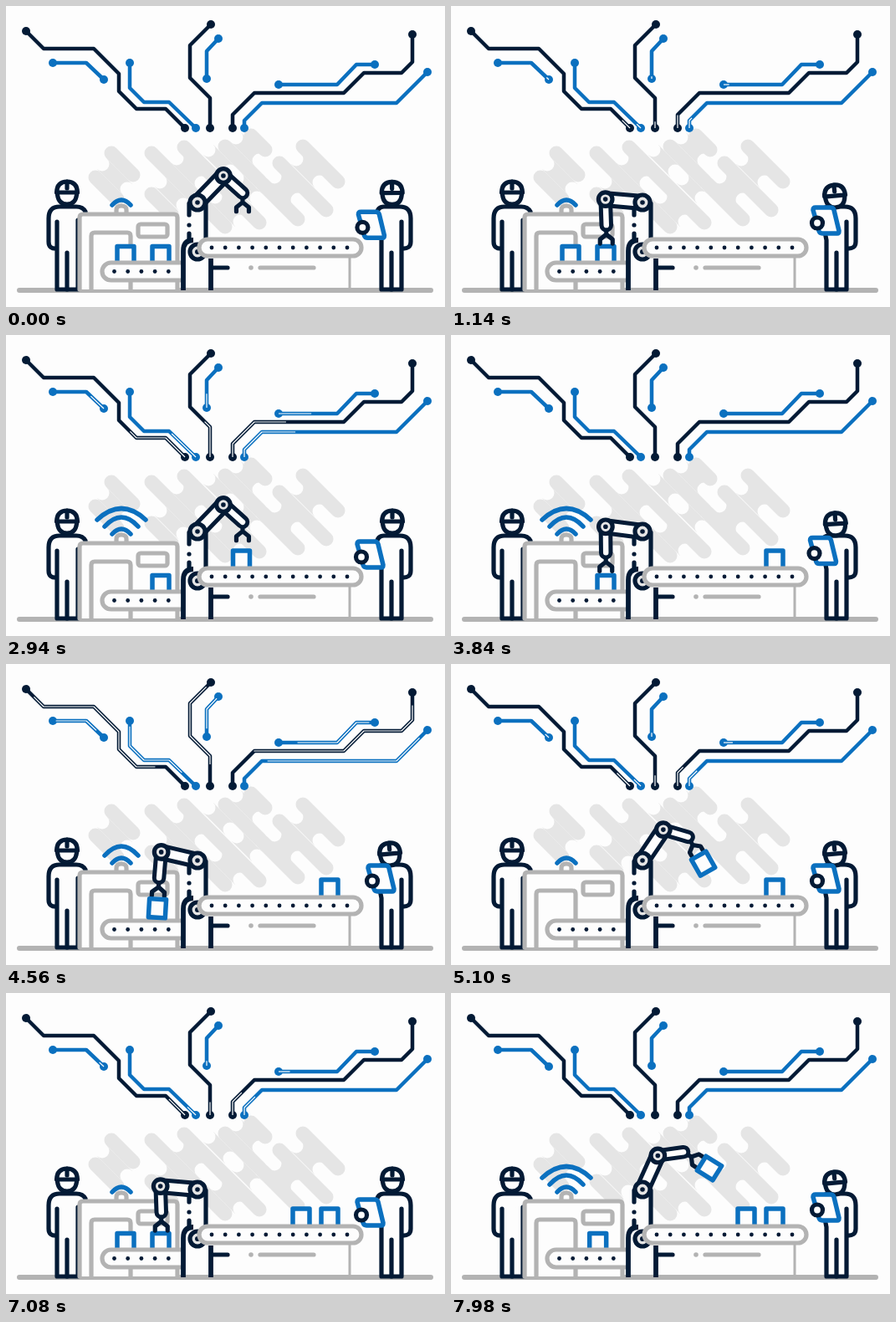
Recreate the animation shown at these times as an HTML page. Size 525 by 360 pixels, loop 8 s.

```html
<!DOCTYPE html>
<html lang="en">
<head>
<meta charset="utf-8">
<title>Smart factory</title>
<style>
html, body { margin: 0; width: 100%; height: 100%; overflow: hidden; background: #fdfdfd; }
svg { display: block; width: 525px; height: 360px; }
svg * { fill: none; stroke-linecap: round; stroke-linejoin: round; }
.navy { stroke: #031a35; stroke-width: 5.2; }
.blue { stroke: #0b70bf; stroke-width: 5.5; }
.gray { stroke: #b3b3b3; stroke-width: 5.2; }
.blob { stroke: #e5e5e5; stroke-width: 17; }
.gap { stroke: #fdfdfd; }
.wire { stroke-width: 4.5; }
.pulse { stroke: #fff; stroke-width: 1.2; }
.butt { stroke-linecap: butt; }
.solid { fill: #fdfdfd; }
.pin { fill: #e5e5e5; }
.dot { fill: #031a35; }
.dot.blue { fill: #0b70bf; stroke: none; }
.dot.gray { fill: #b3b3b3; stroke: none; }
</style>
</head>
<body>
<svg id="stage" viewBox="0 0 525 360">
  <defs><clipPath id="door"><rect x="104" y="240" width="120" height="70"/></clipPath></defs>
  <g id="blobs"></g>
  <g id="wires"></g>

  <path class="gray" d="M16 340H508" style="stroke-width:6"/>
  <g id="leftWorker" class="navy">
    <path class="solid" d="M61 258V339H86V256M61 290Q51 291 51 282V254Q51 240 64 240H84Q92 240 95 246"/>
    <path d="M73 295V339"/>
  </g>

  <path class="gray solid" d="M132 247V244Q132 239 138 239T144 244V247"/>
  <path class="gray solid" d="M88 339V253Q88 249 92 249H201Q205 249 205 253V339"/>
  <path class="gray" d="M102 339V275Q102 271 106 271H145Q149 271 149 275V339"/>
  <rect class="gray" x="158" y="261" width="35" height="15" rx="3"/>
  <g class="blue">
    <path d="M127 238Q138 226 149 238"/>
    <path id="wave1" d="M118 229Q138 207 158 229"/>
    <path id="wave2" d="M109 221Q138 194 167 221"/>
  </g>
  <g id="leftBoxes" clip-path="url(#door)"></g>
  <rect class="gray solid" x="115" y="307" width="120" height="21" rx="10.5"/>
  <g id="leftDots"></g>

  <path class="solid" d="M219 236H239V280L245 300V337H212V292L219 280Z"/>
  <path class="navy" d="M219 236V250M219 272V279M239 236V280"/>
  <path class="navy butt" d="M212 340V293Q212 280 224 280M245 302V340" style="stroke-width:5.8"/>
  <circle class="dot" cx="219" cy="262" r="2.6"/>
  <circle class="navy pin" cx="229" cy="294" r="9"/>
  <circle class="dot" cx="229" cy="294" r="3"/>
  <path class="navy" d="M247 313H265"/>
  <path class="gray" d="M411 300V338" style="stroke-width:3"/>
  <circle class="dot gray" cx="293" cy="313" r="2.8"/>
  <path class="gray" d="M304 313H368"/>
  <g id="rightBoxes"></g>
  <rect class="gray solid" x="231" y="279" width="194" height="20" rx="10"/>
  <g id="rightDots"></g>

  <g id="arm"></g>
  <g id="carried"></g>

  <g class="navy">
    <path class="solid" d="M473 258V339H449V280L443 250Q444 240 452 240H471Q484 240 484 254V282Q484 291 473 290"/>
    <path d="M461 295V339"/>
  </g>
  <g id="rightHead"></g>
  <g id="tablet">
    <path class="blue solid" d="M423 247H441Q444 247 445 250L451 275Q451 278 449 278H431Q428 278 427 275L420 250Q420 247 423 247Z"/>
    <circle class="navy solid" cx="425" cy="265.5" r="6.5"/>
  </g>
</svg>
<script>
const $ = id => document.getElementById(id);
const make = (parent, tag, cls, attrs) => {
  const el = document.createElementNS('http://www.w3.org/2000/svg', tag);
  el.setAttribute('class', cls);
  for (const k in attrs) el.setAttribute(k, attrs[k]);
  return parent.appendChild(el);
};
const path = (parent, cls, d) => make(parent, 'path', cls, { d });
const disc = (parent, cls, cx, cy, r) => make(parent, 'circle', cls, { cx, cy, r });

// Background: 45 degree capsules, joined by bridges with hollow ends ("x y run")
const capsules = ['126 176 26', '107 205 26', '174 176 88', '213 169 90', '262 168 42', '293 155 17',
  '174 225 24', '355 168 42', '327 188 56', '307 213 42'];
const bridges = ['115 189 30', '204 182 30', '250 228 30', '242 172 26', '276 206 24', '275 157 28',
  '184 210 28', '347 183 28', '321 204 28'];
const diagonal = (cls, text) => {
  const [x, y, run] = text.split(' ').map(Number);
  path($('blobs'), cls, `M${x} ${y}l${run} ${run}`);
  return [[x, y], [x + run, y + run]];
};
const hollows = bridges.flatMap(b => diagonal('blob butt', b));
for (const [x, y] of hollows) disc($('blobs'), 'solid', x, y, 8.5);
for (const c of capsules) diagonal('blob', c);

const wires = [
  ['navy', '24 30 45 51 105 51 135 81 135 102 156 123 191 123 214 146'],
  ['blue', '56 68 96 68 117 88'],
  ['blue', '148 68 148 98 165 115 195 115 227 146'],
  ['navy', '245 22 220 47 220 86 244 110 244 146'],
  ['blue', '254 39 240 54 240 87'],
  ['navy', '486 34 486 67 473 80 428 80 404 104 297 104 271 130 271 146'],
  ['blue', '441 70 419 70 396 94 326 94'],
  ['blue', '504 79 467 116 306 116 285 137 285 146'],
];
const pulses = wires.map(([color, text]) => {
  const n = text.split(' '), d = 'M' + text, g = $('wires');
  const dot = color === 'blue' ? 'dot blue' : 'dot';
  path(g, color + ' wire', d);
  disc(g, dot, n[0], n[1], 5);
  disc(g, dot, n[n.length - 2], n[n.length - 1], 5);
  return make(g, 'path', 'pulse butt', { d, pathLength: 1 });
});

const DOT_GAP = 16.2;
for (let i = 0; i < 5; i++) disc($('leftDots'), 'dot', 129.5 + i * DOT_GAP, 317.5, 2.4);
for (let i = 0; i < 11; i++) disc($('rightDots'), 'dot', 246 + i * DOT_GAP, 289, 2.4);

// Worker heads, drawn around their own centre
function head(parent) {
  path(parent, 'navy solid', 'M-11.5 0V4Q-10 15 0 15T11.5 4V0');
  path(parent, 'navy solid', 'M-12.5 1Q-12 -12 0 -12T12.5 1Z');
  path(parent, 'navy', 'M0 -12V-4');
}
head(make($('leftWorker'), 'g', '', { transform: 'translate(73 222)' }));
head($('rightHead'));

// Robot arm
const arm = $('arm'), SHOULDER = [229, 235], UPPER = 44.5, FORE = 31, GRIP = 35;
function link(width) {
  const outer = path(arm, 'navy', ''), inner = path(arm, 'gap', '');
  outer.style.strokeWidth = width;
  inner.style.strokeWidth = width - 10;
  return d => { outer.setAttribute('d', d); inner.setAttribute('d', d); };
}
function joint(r) {
  const g = make(arm, 'g', '');
  disc(g, 'navy pin', 0, 0, r);
  disc(g, 'dot', 0, 0, 2.8);
  return g;
}
const claw = path(arm, 'navy', 'M0 0H11M22 -7.5H17L11 0L17 7.5H22');
const foreLink = link(16.5), upperLink = link(20);
const elbowJoint = joint(8.3);
joint(9).setAttribute('transform', `translate(${SHOULDER})`);

const CYCLE = 2940, PICK = 1300, DROP = 2600;
const ABOVE_BELT = [-46, 42, 90], ON_BELT = [-40, 56, 90];
const ABOVE_PICK = [-168, -268, -270], AT_PICK = [-175, -272, -270];
const armKeys = [
  [0, ABOVE_BELT], [620, ABOVE_PICK], [700, ABOVE_PICK], [1040, AT_PICK], [PICK, AT_PICK],
  [1570, ABOVE_PICK], [2310, ABOVE_BELT], [2560, ON_BELT], [2640, ON_BELT], [2860, ABOVE_BELT],
  [CYCLE, ABOVE_BELT],
];

const ease = p => p < 0.5 ? 2 * p * p : 1 - 2 * (1 - p) ** 2;
const ramp = (t, from, to) => ease(Math.min(1, Math.max(0, (t - from) / (to - from))));
const step = ([x, y], length, deg) =>
  [x + length * Math.cos(deg * Math.PI / 180), y + length * Math.sin(deg * Math.PI / 180)];

function armAngles(t) {
  const i = armKeys.findIndex(([at]) => at > t);
  const [from, a] = armKeys[i - 1], [to, b] = armKeys[i];
  const p = ramp(t, from, to);
  return a.map((v, k) => v + (b[k] - v) * p);
}

function makeBox() {
  return make($('leftBoxes'), 'rect', 'blue solid', { x: -10, y: -9.5, width: 20, height: 22 });
}
// Each item: place on the feeding belt and final place on the outgoing belt
const shift = t => 42 * ramp(t, 1700, 2300);
const feed = t => 100 * ramp(t, 5160, 5820);
const items = [
  { x: () => 185, end: 387 },
  { x: t => 143 + shift(t), end: 353 },
  { x: t => 85 + feed(t), end: 319 },
  { x: t => 43 + feed(t) + shift(t - 2 * CYCLE), end: 285 },
].map(item => ({ ...item, el: makeBox() }));

function place(el, parent, x, y, deg = 0) {
  if (el.parentNode !== parent) parent.appendChild(el);
  el.setAttribute('transform', `translate(${x} ${y}) rotate(${deg})`);
}

function draw(t) {
  const beat = t % 2000;
  const front = ramp(beat, 0, 800), back = ramp(beat, 420, 1280);
  for (const p of pulses) {
    p.style.display = front > back ? '' : 'none';
    p.setAttribute('stroke-dasharray', `${front - back} 2`);
    p.setAttribute('stroke-dashoffset', -back);
  }

  const wave = Math.floor(t % 1000 / 333.4);
  $('wave1').style.display = wave > 0 ? '' : 'none';
  $('wave2').style.display = wave > 1 ? '' : 'none';

  const [upper, fore, grip] = armAngles(t % CYCLE);
  const elbow = step(SHOULDER, UPPER, upper), wrist = step(elbow, FORE, fore);
  upperLink(`M${SHOULDER}L${elbow}`);
  foreLink(`M${elbow}L${wrist}`);
  elbowJoint.setAttribute('transform', `translate(${elbow})`);
  claw.setAttribute('transform', `translate(${wrist}) rotate(${grip})`);

  items.forEach(({ x, end, el }, i) => {
    const age = t - i * CYCLE;
    if (age < PICK) place(el, $('leftBoxes'), x(t), 297);
    else if (age < DROP) place(el, $('carried'), ...step(wrist, GRIP, grip), grip - 90);
    else place(el, $('rightBoxes'), 281.5 + (end - 281.5) * ramp(age, CYCLE + 80, CYCLE + 780), 267.5);
  });

  // The inspector lifts the tablet and lowers the head towards it
  const w = (t + 140) % 3600;
  const look = ramp(w, 0, 600) - ramp(w, 1840, 2440);
  $('tablet').setAttribute('transform', `translate(${13 * look} ${-6 * look})`);
  $('rightHead').setAttribute('transform',
    `translate(${462 - 3 * look} ${222 + 4 * look}) rotate(${-5 * look})`);
}

const LOOP = 8000, TICK = 60;
const start = performance.now();
function frame() {
  const t = (performance.now() - start) % LOOP;
  draw(Math.floor(t / TICK) * TICK);
  requestAnimationFrame(frame);
}
frame();
</script>
</body>
</html>
```
